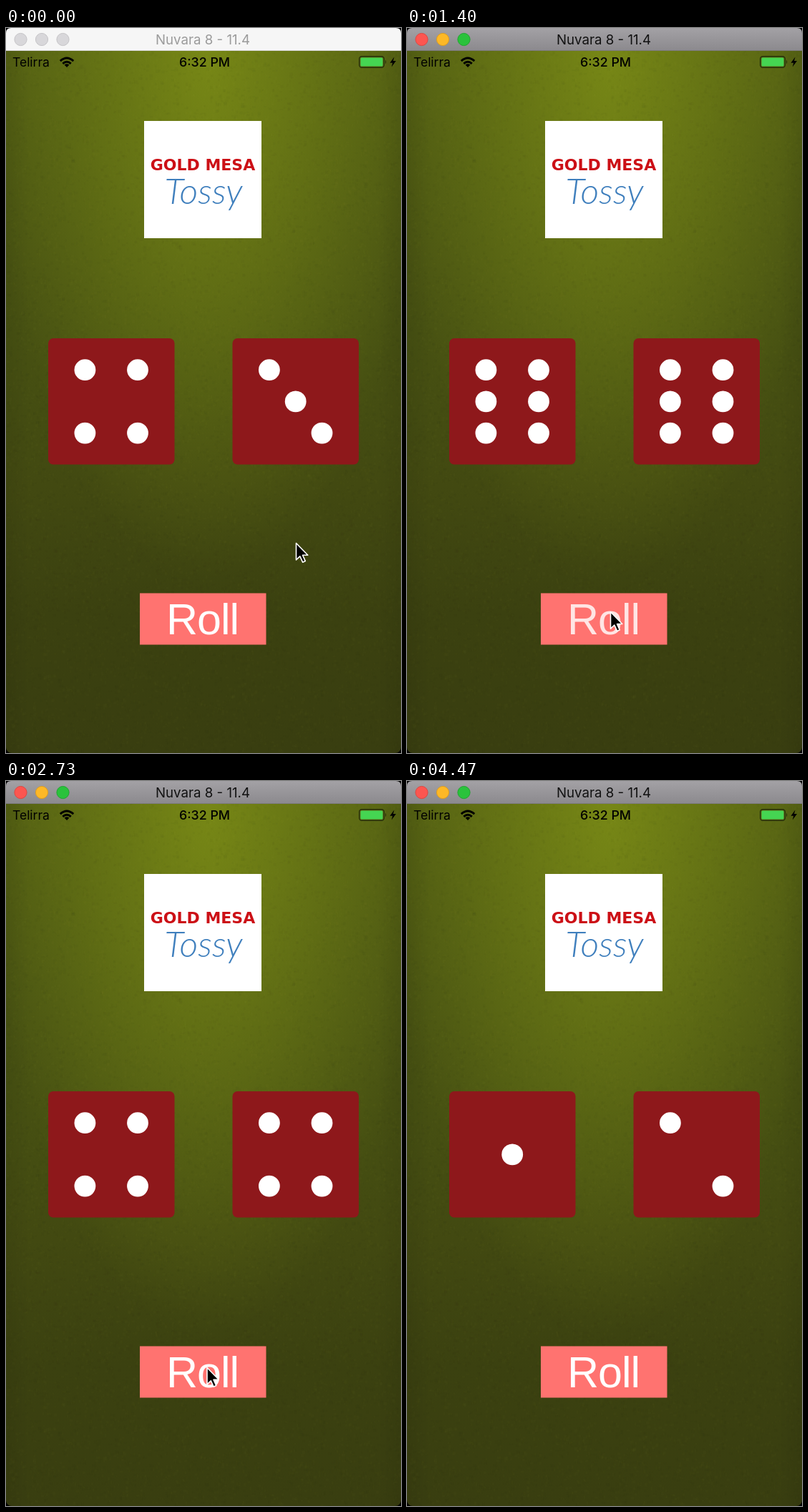
Animation, 552 px wide and 1014 px high, one loop 4540 ms. Source, as an HTML page with a canvas:

```html
<!DOCTYPE html>
<html lang="en">
<head>
<meta charset="utf-8">
<title>Dice roll</title>
<style>
  html, body { margin: 0; width: 100%; height: 100%; overflow: hidden; background: #000; }
  canvas, svg { position: absolute; left: 0; top: 0; width: 552px; height: 1014px; display: block; }
  .ui { font-family: Inter, Roboto, sans-serif; }
  .roll { font: 61px "Liberation Sans", Arial, sans-serif; letter-spacing: -1px; }
  .head { font: bold 22px "DejaVu Sans", sans-serif; }
  .script { font: italic 300 50px Lato, "Open Sans", sans-serif; }
</style>
</head>
<body>
<canvas id="felt" width="552" height="1014"></canvas>
<svg viewBox="0 0 552 1014" xmlns="http://www.w3.org/2000/svg">
  <defs>
    <linearGradient id="bar" x2="0" y2="1">
      <stop offset="0" stop-color="#a3a1a5"/>
      <stop offset="1" stop-color="#8b898d"/>
    </linearGradient>
  </defs>

  <path id="titleBar" d="M0 32V7Q0 0 7 0H545Q552 0 552 7V32Z"/>
  <path id="barLine" d="M0 31.5H552"/>
  <g id="lights"></g>
  <text id="title" class="ui" x="275" y="23" font-size="18.7" text-anchor="middle">Nuvara 8 - 11.4</text>

  <g class="ui" font-size="17.5">
    <text x="9" y="54">Telirra</text>
    <text x="277.5" y="54" font-weight="500" font-size="17.8" text-anchor="middle">6:32 PM</text>
  </g>
  <g fill="none" stroke="#000" stroke-width="3">
    <path d="M75.8 46.2Q85 37.8 94.2 46.2"/>
    <path d="M79.3 49.8Q85 44.8 90.7 49.8"/>
  </g>
  <path d="M81.6 51.6Q85 49 88.4 51.6L85 55Z"/>
  <rect x="493.7" y="39.7" width="34.6" height="15.6" rx="3.5" fill="none" stroke="#26300b" stroke-width="1.4"/>
  <rect x="495.5" y="41.5" width="31" height="12" rx="1.5" fill="#45d552"/>
  <path d="M530 44.5Q532.5 47.5 530 50.5Z" fill="#26300b"/>
  <path d="M542.5 40.5L536.5 48.7H540.2L538.7 54.5L545 46H541Z"/>

  <rect x="193" y="130" width="164" height="164" fill="#fff"/>
  <text class="head" x="275" y="199" text-anchor="middle" fill="#cc1016">GOLD MESA</text>
  <text class="script" x="276" y="246" text-anchor="middle" fill="#3f7fbd">Tossy</text>

  <g id="dice"></g>

  <rect x="187" y="790.5" width="176.5" height="72" fill="#ff7370"/>
  <text id="label" class="roll" x="224" y="848" fill="#fff">Roll</text>

  <path id="cursor" d="M0 0V23.4L5.3 18.3L9.1 26.7L12.8 25.1L9.1 16.8H16.3Z"
        fill="#000" stroke="#fff" stroke-width="1.6" stroke-linejoin="round"/>
</svg>
<script>
const LOOP = 4540, STEP = 200 / 3, FADE = 350;
const $ = id => document.getElementById(id);

// Each press dims the label; releasing rolls the dice and fades it back.
const ROLLS = [
  { down: 460, up: 600, faces: [6, 6] },
  { down: 1040, up: 1130, faces: [6, 6] },
  { down: 1560, up: 1670, faces: [5, 1] },
  { down: 2150, up: 2260, faces: [4, 4] },
  { down: 2790, up: 2910, faces: [4, 5] },
  { down: 3380, up: 3500, faces: [3, 6] },
  { down: 3950, up: 4050, faces: [1, 2] }
];
const PATH = [
  [0, 405.5, 720.5], [480, 310.5, 804.5], [600, 310.5, 804.5], [1000, 294, 816.5],
  [1150, 294, 816.5], [1650, 275, 817], [1850, 275, 817], [2150, 281, 820.5]
];
const ACTIVATE = 460, CURSOR_END = 4400;

// Pips are numbered row by row on a 3 x 3 grid.
const FACES = ["", "4", "08", "048", "0268", "02468", "023568"];

function add(parent, name, attrs) {
  const el = document.createElementNS("http://www.w3.org/2000/svg", name);
  for (const key in attrs) el.setAttribute(key, attrs[key]);
  return parent.appendChild(el);
}

function makeDie(x) {
  add($("dice"), "rect", { x, y: 434, width: 176.5, height: 176.5, rx: 7, fill: "#8e181b" });
  return Array.from({ length: 9 }, (_, i) => add($("dice"), "circle", {
    cx: x + 88.2 + (i % 3 - 1) * 36.8,
    cy: 522.4 + (Math.floor(i / 3) - 1) * 44.2,
    r: 14.9, fill: "#fff"
  }));
}

const dice = [59, 316.5].map(makeDie);
const lights = [20.5, 50, 79.5].map(cx => add($("lights"), "circle", { cx, cy: 16, r: 8.6 }));

function paintFelt() {
  const g = $("felt").getContext("2d");
  const fill = (gradient, stops) => {
    stops.forEach(([at, colour]) => gradient.addColorStop(at, colour));
    g.fillStyle = gradient;
    g.fillRect(-600, -600, 1800, 2200);
  };
  g.beginPath();
  g.roundRect(0, 20, 552, 994, [0, 0, 8, 8]);
  g.clip();
  fill(g.createLinearGradient(0, 32, 0, 1014),
    [[0, "#525e13"], [.4, "#475112"], [.62, "#424911"], [.8, "#3b4110"], [1, "#393e10"]]);
  g.save();
  g.translate(282, 40);
  g.scale(1, 2.4);
  fill(g.createRadialGradient(0, 0, 0, 0, 0, 305),
    [[0, "rgba(150,170,24,.54)"], [1, "rgba(150,170,24,0)"]]);
  g.restore();
  fill(g.createLinearGradient(0, 0, 552, 0),
    [[0, "rgba(0,0,0,.07)"], [.06, "rgba(0,0,0,0)"], [.94, "rgba(0,0,0,0)"], [1, "rgba(0,0,0,.07)"]]);

  let seed = 7;
  const random = () => (seed = seed * 16807 % 2147483647) / 2147483647;
  for (let i = 0; i < 14000; i++) {
    g.fillStyle = random() < .5 ? "rgba(0,0,0,.022)" : "rgba(190,200,60,.016)";
    g.fillRect(random() * 552, random() * 1014, 2 + random() * 3, 2 + random() * 3);
  }
}

function cursorAt(t) {
  const next = PATH.findIndex(p => p[0] > t);
  if (next < 0) return PATH[PATH.length - 1].slice(1);
  const [a, b] = [PATH[next - 1], PATH[next]];
  const u = (t - a[0]) / (b[0] - a[0]);
  const e = u * u * (3 - 2 * u);
  return [1, 2].map(i => a[i] + (b[i] - a[i]) * e);
}

function labelAlpha(t) {
  const press = ROLLS.filter(r => r.down <= t).pop();
  if (!press) return 1;
  return .2 + .8 * Math.min(1, Math.max(0, (t - press.up) / FADE));
}

function draw(t) {
  const active = t >= ACTIVATE;
  $("titleBar").setAttribute("fill", active ? "url(#bar)" : "#f6f6f6");
  $("barLine").setAttribute("stroke", active ? "#7c7a7e" : "#d4d4d4");
  $("title").setAttribute("fill", active ? "#111" : "#9b9b9b");
  lights.forEach((el, i) => {
    el.setAttribute("fill", active ? ["#fc5650", "#fdb827", "#2ac23c"][i] : "#d8d7da");
    el.setAttribute("stroke", active ? ["#df4640", "#dd9d20", "#20a62f"][i] : "#c5c4c7");
  });

  const rolled = ROLLS.filter(r => r.up <= t).pop();
  const faces = rolled ? rolled.faces : [4, 3];
  dice.forEach((pips, d) => pips.forEach((pip, i) =>
    pip.setAttribute("visibility", FACES[faces[d]].includes(i) ? "visible" : "hidden")));

  $("label").setAttribute("opacity", labelAlpha(t));
  $("cursor").setAttribute("transform", `translate(${cursorAt(t)})`);
  $("cursor").setAttribute("visibility", t < CURSOR_END ? "visible" : "hidden");
}

const start = performance.now();
function tick() {
  const t = (performance.now() - start) % LOOP;
  draw(Math.floor((t + 4) / STEP) * STEP);
  requestAnimationFrame(tick);
}

paintFelt();
tick();
</script>
</body>
</html>
```
